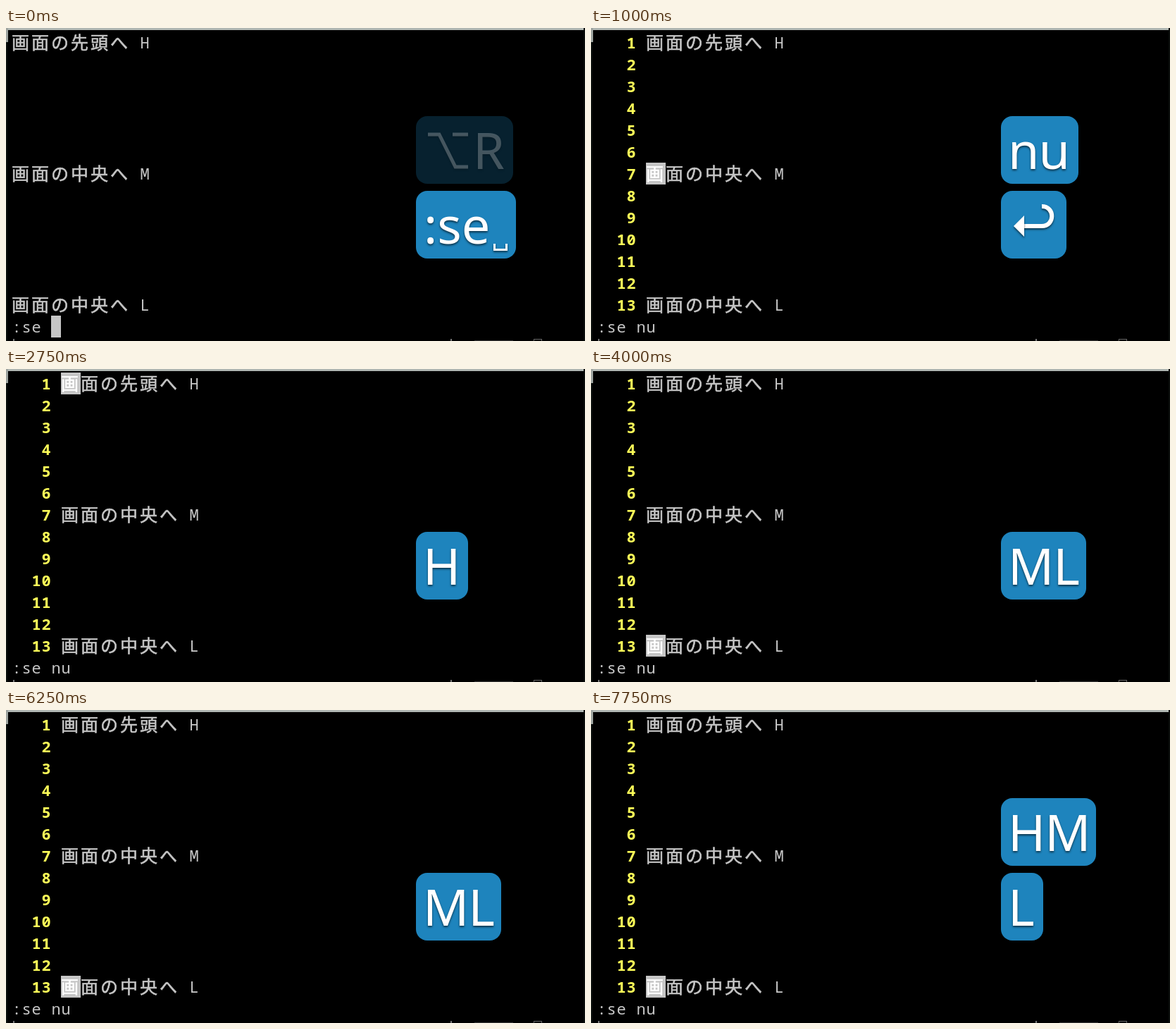
Write an HTML page with a canvas that moves like this. It is 822 px wide and 444 px high and loops after 8000 ms.

```html
<!DOCTYPE html>
<html lang="ja">
<head>
<meta charset="utf-8">
<style>
html, body { margin: 0; height: 100%; overflow: hidden; background: #000; }
canvas { display: block; }
</style>
</head>
<body>
<canvas id="stage" width="822" height="444"></canvas>
<script>
const ctx = document.getElementById('stage').getContext('2d');
const LOOP = 8000, STEP = 250;
const CELL = 14, ROW = 31, LEFT = 8, TOP = 5;
const GREY = '#c6c6c6', YELLOW = '#fdfd58', BLUE = '#1e84bd';
const LATIN = '22px "Noto Sans Mono", monospace';
const KANJI = '25px "Noto Sans CJK JP", "Noto Sans CJK", sans-serif';
const LINES = { 0: '画面の先頭へ H', 6: '画面の中央へ M', 12: '画面の中央へ L' };
const RUN_AT = 1000;

// Each badge lists its key presses: [time, text so far, cursor row].
const badges = [
  [[-1000, '⌥R']],
  [[-250, ':se␣']],
  [[250, 'n'], [500, 'nu']],
  [[1000, '↩', 6]],
  [[2500, 'H', 0]],
  [[3500, 'M', 6], [3750, 'ML', 12]],
  [[4750, 'H', 0]],
  [[5250, 'M', 6], [5500, 'ML', 12]],
  [[6750, 'H', 0], [7250, 'HM', 6]],
  [[7750, 'L', 12]],
];
const HOLD = 1000, FADE = 250, FAINT = 0.25;
const WIDTHS = { '⌥R': 138, ':se␣': 142, n: 66, nu: 110, '↩': 93, H: 74, M: 83, L: 60, ML: 121, HM: 135 };

function rect(x, y, w, h, color) {
  ctx.fillStyle = color;
  ctx.fillRect(x, y, w, h);
}

function put(text, col, row, color, weight = '500 ') {
  ctx.fillStyle = ctx.strokeStyle = color;
  ctx.lineWidth = 0.6;
  let x = LEFT + col * CELL;
  const y = TOP + row * ROW + 24;
  for (const ch of text) {
    if (ch > '\u2fff') {
      ctx.font = KANJI;
      ctx.fillText(ch, x, y + 1);
      ctx.strokeText(ch, x, y + 1);
      x += 2 * CELL;
    } else {
      ctx.font = weight + LATIN;
      ctx.fillText(ch, x + 0.4, y);
      x += CELL;
    }
  }
}

function block(col, row, cells) {
  rect(LEFT + col * CELL, TOP + row * ROW, cells * CELL, ROW, GREY);
}

function drawTerminal(t) {
  const numbered = t >= RUN_AT, col = numbered ? 5 : 0;
  for (const row in LINES) put(LINES[row], col, +row, GREY);
  const typed = t < 250 ? ':se ' : t < 500 ? ':se n' : ':se nu';
  put(typed, 0, 13, GREY);
  if (!numbered) return block(typed.length, 13, 1);

  for (let row = 0; row < 13; row++) put(String(row + 1).padStart(4), 0, row, YELLOW, '600 ');
  const presses = badges.flat().filter(([at, , row]) => at <= t && row !== undefined);
  const row = presses.at(-1)[2];
  block(col, row, 2);
  put(LINES[row][0], col, row, '#fff');
}

function drawFrame() {
  rect(0, 0, 2, 444, '#0d110f');
  rect(820, 0, 2, 444, '#0b0e0c');
  rect(0, 0, 820, 3, '#afb6b2');
  rect(0, 0, 3, 20, '#9da39f');
  rect(10, 441, 2, 3, '#777');
  rect(631, 441, 2, 3, '#777');
  rect(665, 443, 55, 1, '#333');
  rect(749, 441, 12, 1, '#666');
  rect(749, 441, 1, 3, '#666');
  rect(760, 441, 1, 3, '#666');
}

function drawLabel(text) {
  ctx.fillStyle = ctx.strokeStyle = '#fff';
  ctx.shadowColor = 'rgba(0,0,0,.6)';
  ctx.shadowOffsetY = 2;
  ctx.shadowBlur = 3;
  ctx.font = '72px "Noto Sans", sans-serif';
  ctx.lineWidth = 5;
  if (text === '⌥R') {
    ctx.stroke(new Path2D('M17 26H33L56 72H74M52 26H74'));
    ctx.fillText('R', 81, 75);
  } else if (text === '↩') {
    ctx.lineWidth = 6;
    ctx.stroke(new Path2D('M32 50H58C77 50 77 22 58 22'));
    ctx.fill(new Path2D('M18 50L33 35V65Z'));
  } else if (text === ':se␣') {
    ctx.fillText(':se', 11, 75);
    ctx.lineWidth = 3;
    ctx.stroke(new Path2D('M111.5 75V83.5H128.5V75'));
  } else {
    ctx.letterSpacing = '-1px';
    ctx.fillText(text, 10, 75);
  }
}

function drawBadges(t) {
  const shown = badges.map(keys => keys.filter(([at]) => at <= t).at(-1)).filter(Boolean).reverse();
  shown.forEach(([at, text], level) => {
    const age = t - at;
    if (age >= HOLD + FADE) return;
    ctx.save();
    ctx.translate(582, 231 - 106 * level);
    ctx.globalAlpha = age < HOLD ? 1 : FAINT;
    ctx.fillStyle = BLUE;
    ctx.beginPath();
    ctx.roundRect(0, 0, WIDTHS[text], 96, 16);
    ctx.fill();
    drawLabel(text);
    ctx.restore();
  });
}

function draw() {
  const t = Math.floor(performance.now() % LOOP / STEP) * STEP;
  rect(0, 0, 822, 444, '#000');
  drawTerminal(t);
  drawFrame();
  drawBadges(t);
  requestAnimationFrame(draw);
}
draw();
</script>
</body>
</html>
```
